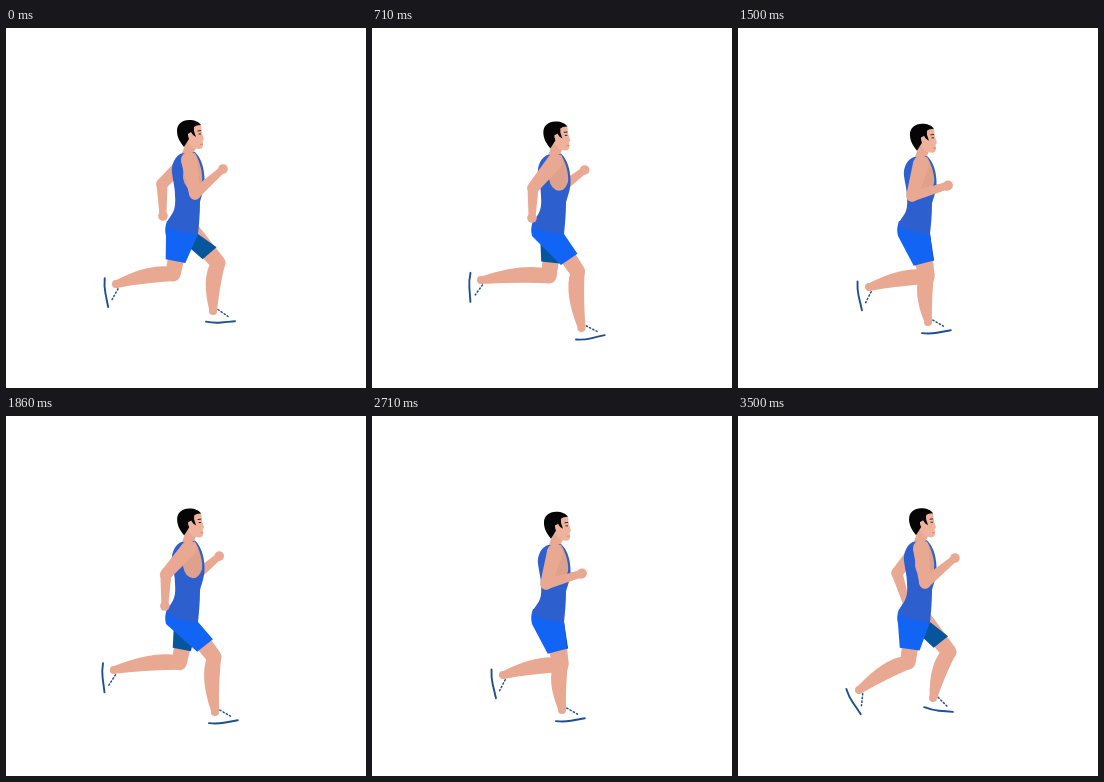
Animation of 360x360 px, one loop 3570 ms. Source, as an HTML page with a canvas:

```html
<!DOCTYPE html>
<html lang="en">
<head>
<meta charset="utf-8">
<title>Running man</title>
<style>
  html, body { margin: 0; width: 100%; height: 100%; overflow: hidden; background: #fff; }
  canvas { display: block; width: 360px; height: 360px; }
</style>
</head>
<body>
<canvas id="stage"></canvas>
<script>
const canvas = document.getElementById('stage');
const ctx = canvas.getContext('2d');
const ratio = window.devicePixelRatio || 1;
canvas.width = canvas.height = 360 * ratio;

const LOOP = 3570, POSES = 25;
const SKIN = '#e9a892', SHADE = '#dea18b', FACE = '#efb39d';
const VEST = '#2e5fce', NEAR = '#1264f5', FAR = '#07559d', SOLE = '#1f4f90';

// phase, knee x y, ankle x y, foot angle
const nearLeg = [
  [0, 167, 246, 110, 256, 84],
  [1, 169, 247, 107, 252, 90],
  [3, 176, 249, 110, 250, 92],
  [5, 183, 250, 119, 253, 88],
  [7, 189, 249, 131, 259, 82],
  [9, 193, 245, 148, 266, 69],
  [11, 204, 240, 172, 276, 42],
  [12.5, 210, 238, 197, 287, 10],
  [14, 208, 241, 209, 296, -5],
  [16, 202, 246, 207, 303, -8],
  [18, 192, 249, 197, 305, -2],
  [19.5, 186, 251, 186, 304, 5],
  [21, 180, 252, 172, 300, 15],
  [22, 176, 252, 161, 300, 23],
  [24, 170, 246, 121, 274, 61]
];
const farLeg = [
  [0, 212, 235, 207, 283, 0],
  [1.5, 213, 237, 217, 288, -8],
  [3, 211, 239, 218, 293, -10],
  [5, 202, 243, 208, 296, -8],
  [7, 189, 247, 190, 294, -5],
  [9, 178, 248, 168, 292, 4],
  [11, 171, 247, 138, 279, 40],
  [12, 170, 246, 120, 267, 64],
  [13.5, 172, 246, 109, 256, 84],
  [15, 177, 248, 109, 252, 91],
  [17, 186, 249, 120, 255, 86],
  [19, 196, 248, 138, 262, 72],
  [21, 206, 243, 163, 269, 50],
  [22, 208, 239, 173, 276, 42],
  [24, 211, 236, 195, 282, 10]
];
// phase, elbow x y, hand x y
const arm = [
  [0, 189, 166, 217, 141],
  [3, 187, 167, 217, 143],
  [5, 180, 169, 214, 150],
  [7, 174, 168, 209, 158],
  [9, 169, 165, 204, 175],
  [10.4, 168, 164, 192, 187],
  [12.4, 163, 159, 173, 191],
  [13.4, 160, 158, 161, 190],
  [15, 161, 160, 160, 190],
  [17, 167, 165, 178, 187],
  [19, 176, 169, 206, 170],
  [21, 183, 169, 216, 155],
  [22, 184, 168, 215, 149],
  [24, 187, 167, 217, 142]
];

// smooth periodic curve through the rows of a table
function sample(rows, phase) {
  const p = ((phase % POSES) + POSES) % POSES, n = rows.length;
  const row = i => rows[(i + n) % n];
  const at = i => row(i)[0] + POSES * Math.floor(i / n);
  let i = n - 1;
  while (rows[i][0] > p) i--;
  const h = at(i + 1) - at(i), s = (p - at(i)) / h;
  return row(i).slice(1).map((v, c) => {
    const val = j => row(j)[c + 1];
    const slope = j => (val(j + 1) - val(j - 1)) / (at(j + 1) - at(j - 1)) * h;
    const s2 = s * s, s3 = s2 * s;
    return (2 * s3 - 3 * s2 + 1) * v + (s3 - 2 * s2 + s) * slope(i)
      + (3 * s2 - 2 * s3) * val(i + 1) + (s3 - s2) * slope(i + 1);
  });
}

function shape(d, color) {
  ctx.fillStyle = color;
  ctx.fill(new Path2D(d));
}

function disc(x, y, r, color) {
  ctx.fillStyle = color;
  ctx.beginPath();
  ctx.arc(x, y, r, 0, 7);
  ctx.fill();
}

// unit vector pointing to the back of a limb
function backOf(x0, y0, x1, y1) {
  const len = Math.hypot(x1 - x0, y1 - y0) || 1;
  return [(y0 - y1) / len, (x1 - x0) / len];
}

function limb(x0, y0, r0, x1, y1, r1, color) {
  const [bx, by] = backOf(x0, y0, x1, y1);
  shape(`M${x0 + bx * r0} ${y0 + by * r0}L${x1 + bx * r1} ${y1 + by * r1}` +
    `L${x1 - bx * r1} ${y1 - by * r1}L${x0 - bx * r0} ${y0 - by * r0}Z`, color);
  disc(x0, y0, r0, color);
  disc(x1, y1, r1, color);
}

function shank(kx, ky, ax, ay) {
  const [bx, by] = backOf(kx, ky, ax, ay);
  const pt = (t, w) => `${kx + (ax - kx) * t + bx * w} ${ky + (ay - ky) * t + by * w}`;
  shape(`M${pt(0, 7)}Q${pt(.36, 15)} ${pt(1, 3.6)}L${pt(1.06, 0)}L${pt(1, -4)}Q${pt(.45, -4)} ${pt(0, -7.2)}Z`, SKIN);
  disc(ax, ay, 4, SKIN);
}

function shoe(ax, ay, angle) {
  ctx.save();
  ctx.translate(ax, ay);
  ctx.rotate(angle * Math.PI / 180);
  ctx.translate(-7, 11);
  shape('M0 0L1 -8Q6 -5 11 -13L22 -6Q29 -4 29 0Z', '#fff');
  ctx.strokeStyle = SOLE;
  ctx.lineCap = 'round';
  ctx.lineWidth = 1.9;
  ctx.stroke(new Path2D('M0 -.4Q8 1.2 15 .5T29 -.8'));
  ctx.lineWidth = 1.5;
  ctx.setLineDash([1.3, 2.4]);
  ctx.stroke(new Path2D('M12 -12.5L22 -5.5'));
  ctx.restore();
}

function leg(rows, pose, hipX, color, far) {
  const [kx, ky, ax, ay, angle] = sample(rows, pose);
  const hipY = 200, f = .72, w = far ? 9.2 : 10;
  shoe(ax, ay, angle);
  limb(hipX, hipY, 9.5, kx, ky, 7.6, SKIN);
  shank(kx, ky, ax, ay);
  const [bx, by] = backOf(hipX, hipY, kx, ky);
  const hx = hipX + (kx - hipX) * f, hy = hipY + (ky - hipY) * f;
  const left = far ? 'M170 198L168 206' : 'M161 193Q158 201 160 208';
  shape(`${left}L${hx + bx * w} ${hy + by * w}L${hx - bx * w} ${hy - by * w}L192 206L191 197Z`, color);
}

function drawArm(pose, sx, sy, dx, dy) {
  const [ex, ey, hx, hy] = sample(arm, pose);
  const x0 = ex + dx, y0 = ey + dy, x1 = hx + dx, y1 = hy + dy;
  limb(sx, sy, dx ? 6.5 : 8, x0, y0, 5.8, SKIN);
  limb(x0, y0, 5.5, x1, y1, 3.4, SKIN);
  disc(x1, y1, 4.8, SKIN);
}

function torso(bob) {
  ctx.save();
  ctx.translate(0, 205);
  ctx.scale(1, (80 - bob) / 80);
  ctx.translate(0, -205);
  shape('M177 125C169 127 165 137 166 145C167 153 169 160 169 167C170 180 168 184 162 192' +
    'Q160 196 161 198Q174 206 192 206C193 196 194 186 194 174C196 166 199 160 198.500 150' +
    'C198 139 195 130 189 124Z', VEST);
  shape('M178 127L189 125C194 134 197 145 196 153Q193 162 187 162Q179 161 177 150Z', SHADE);
  ctx.restore();
}

function head(dx, dy) {
  ctx.save();
  ctx.translate(dx, dy);
  shape('M183 107L176 125Q182 127 188 124L190 120Z', SKIN);
  shape('M186 96L195 97L196 105L198 111L196.500 113L197 117Q197 121 193 121L187 120L181 113Z', FACE);
  shape('M178 119C174 114 171 109 171 103C171 96 176 92 183 92C189 92 193 94 195 97' +
    'Q190 97 188 99L188 103L190 109L187 107L185 104L182 106L183 111Z', '#050505');
  disc(184.5, 108, 2.2, FACE);
  ctx.strokeStyle = '#39231d';
  ctx.lineWidth = 1;
  ctx.stroke(new Path2D('M191.500 103L195 102.600M192.500 106L195 106'));
  ctx.strokeStyle = '#cf7f70';
  ctx.lineWidth = .8;
  ctx.stroke(new Path2D('M194 116.500L197 116'));
  ctx.restore();
}

function draw(pose) {
  const bob = 2 - 2 * Math.cos(4 * Math.PI * pose / POSES);
  ctx.setTransform(ratio, 0, 0, ratio, 0, 0);
  ctx.fillStyle = '#fff';
  ctx.fillRect(0, 0, 360, 360);
  drawArm(pose + 13.4, 174, 138 + bob, -4, -2);
  leg(farLeg, pose, 182, FAR, true);
  leg(nearLeg, pose, 176, NEAR, false);
  torso(bob);
  head(bob / 4, bob);
  drawArm(pose, 183, 132 + bob, 0, 0);
}

// 14 pictures a second on a 10 ms clock; each moves on by one and a half poses
function tick() {
  const t = Math.floor((performance.now() % LOOP) / 10) * 10;
  const step = Math.floor((t + 5) * .014);
  draw(Math.round(step * 1.5) % POSES);
  requestAnimationFrame(tick);
}
tick();
</script>
</body>
</html>
```
